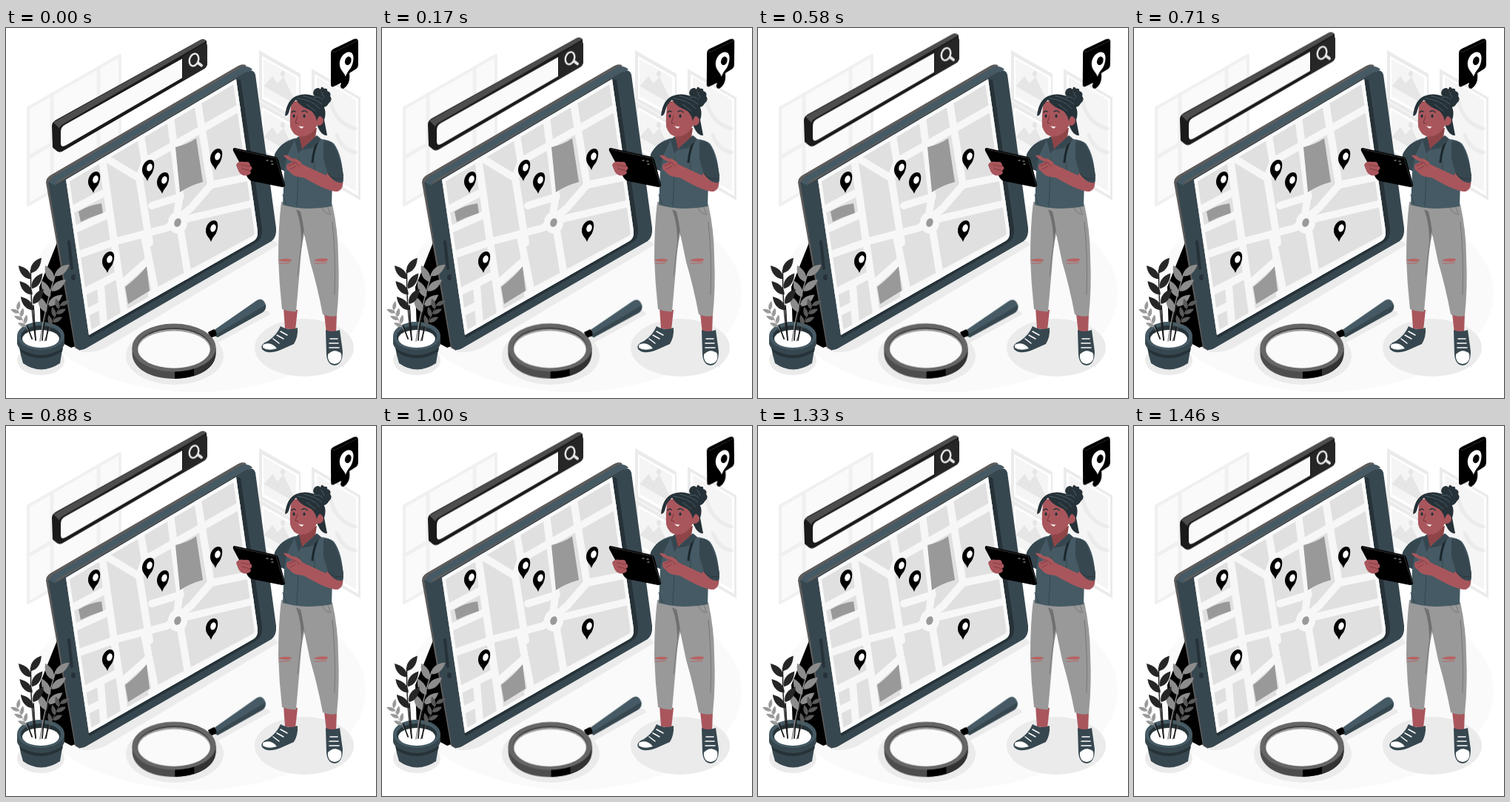
Recreate the animation shown at these times as an HTML page without scripts. Size 500 px wide and 500 px high, loop 1500 ms.

```html
<!DOCTYPE html>
<html lang="en">
<head>
<meta charset="utf-8">
<title>Location search</title>
<style>
html, body { margin: 0; height: 100%; overflow: hidden; background: #fff; }
svg { display: block; width: 100%; height: 100%; }
path { stroke-linejoin: round; }
.line { fill: none; stroke-linecap: round; }
.skin { fill: #a8565c; }
.bar { animation: float 1.5s linear infinite; }
.sway { animation: sway 1.5s linear infinite; }
.bubble { transform-origin: 457.5px 48px; }
.lens { transform-origin: 261px 420px; }
.pin { color: #000; --hole: #fff; }
@keyframes float { 50% { transform: translateY(-10px); } }
@keyframes sway {
  25% { transform: rotate(1deg); }
  75% { transform: rotate(-1deg); }
}
</style>
</head>
<body>
<svg viewBox="0 0 500 500">
<defs>
  <g id="pin">
    <path fill="currentColor" d="M-1 15C-3 9-8 7-8 0C-8-8-2-14 3-14C10-14 9-3 6 3C4 7 1 9-1 15Z"/>
    <ellipse cx=".8" cy="-4" rx="3.6" ry="5.200" transform="rotate(18)" fill="var(--hole)"/>
  </g>
  <path id="leaf" d="M0 0C-7-6-6-17 1-25C6-16 7-7 0 0Z"/>
  <g id="pair">
    <use href="#leaf" transform="rotate(-42)"/>
    <use href="#leaf" transform="translate(0 -8) rotate(36)"/>
  </g>
  <g id="sprig">
    <path class="line" d="M0 0Q-4-45 0-94" stroke="currentColor" stroke-width="1.5"/>
    <g fill="currentColor">
      <use href="#pair" y="-40"/>
      <use href="#pair" y="-61"/>
      <use href="#pair" y="-82"/>
    </g>
  </g>
  <g id="landscape">
    <path fill="#ebebeb" d="M342 30L398 62V130L342 98Z"/>
    <path fill="#fff" d="M346 38L396 66V123L346 95Z"/>
    <path fill="#f5f5f5" d="M348 42L392 67V117L348 92Z"/>
    <path fill="#e6e6e6" d="M349 78L360 65L367 75L375 66L391 99V103L349 79Z"/>
    <ellipse cx="374" cy="62" rx="3" ry="4" fill="#e6e6e6"/>
  </g>
  <clipPath id="screen"><path d="M81 205L311 69L340 274Q341 284 334 288L112 415Z"/></clipPath>
</defs>

<ellipse cx="257" cy="358" rx="229" ry="134" fill="#fafafa"/>

<g id="window">
  <path fill="#fafafa" stroke="#f0f0f0" stroke-width="4" d="M30 108L154 37V168L30 239Z"/>
  <path class="line" stroke="#f0f0f0" stroke-width="5" d="M62 90V220M125 54V185M32 174L153 104"/>
</g>

<g id="frames">
  <use href="#landscape"/>
  <use href="#landscape" y="69"/>
  <path fill="#ebebeb" d="M413 55L479 94V233L413 195Z"/>
  <path fill="#fff" d="M417 62L476 96V227L417 192Z"/>
  <path fill="#f5f5f5" d="M420 66L473 97V221L420 190Z"/>
  <path class="line" stroke="#ebebeb" stroke-width="5" d="M438 96Q444 128 472 136M447 145Q455 165 472 168"/>
</g>

<g id="shadows" fill="#ebebeb">
  <path d="M100 437L362 287L368 293L135 432Q115 441 100 437Z"/>
  <ellipse cx="47" cy="449" rx="32" ry="20"/>
  <ellipse cx="228" cy="443" rx="66" ry="39"/>
  <path d="M272 423L346 382Q356 381 357 387L287 425Z"/>
  <ellipse cx="403" cy="432" rx="67" ry="39"/>
</g>

<g id="tablet">
  <path d="M69 290L45 350L47 410L88 432L100 428Z"/>
  <path fill="#5e5b5b" d="M54 209Q54 203 60 199L314 51Q319 48 324 50L330 70L100 436L93 432Z"/>
  <path fill="#37474f" d="M57 208L68 211L323 60Q334 54 337 63L365 270Q366 282 359 288L108 433Q98 438 94 430Z"/>
  <path fill="#455a64" d="M58 208Q61 202 67 199L318 53Q327 50 333 56L328 60Q326 58 322 60L73 205Q67 208 67 213Z"/>
  <path fill="#263238" d="M311 69L317 70L346 271Q347 285 338 290L113 419L111 414Z"/>
  <path class="line" stroke="#263238" stroke-width="4" d="M85 289L89 325"/>
  <ellipse cx="91" cy="337" rx="3" ry="4" fill="#263238"/>
  <g clip-path="url(#screen)">
    <path fill="#e0e0e0" d="M70 60H350V420H70Z"/>
    <g class="line" stroke="#f7f7f7" stroke-width="10">
      <path d="M129 170L162 400M132 174L180 203L194 290M181 140L188 182M222 120L235 225L231 252M258 95L277 212M180 203L188 180L315 108"/>
      <path d="M92 244L134 222M96 271L138 252M102 305L150 288L218 270L250 243L277 212L330 201M244 258L338 236M236 274L247 340M187 282L203 362"/>
      <path d="M190 316L157 345M150 334L105 357M112 383L128 375M128 348L132 400M197 240L236 228M197 360L342 282"/>
    </g>
    <path class="line" stroke="#fafafa" stroke-width="9" d="M81 205L311 69L340 274Q341 284 334 288L112 415Z"/>
    <g fill="#999">
      <path d="M98 248Q113 239 129 237L131 250Q115 255 101 262Z"/>
      <path d="M229 161Q246 157 257 149L266 208Q248 213 235 222Z"/>
      <path d="M161 350Q180 335 190 322L194 355L165 373Z"/>
    </g>
    <ellipse cx="232" cy="263" rx="13" ry="15" fill="#f7f7f7"/>
    <ellipse cx="232" cy="263" rx="4.500" ry="6" fill="#999" transform="rotate(20 232 263)"/>
  </g>
  <g class="pin">
    <use href="#pin" x="119" y="208"/>
    <use href="#pin" x="192" y="192"/>
    <use href="#pin" x="212" y="209"/>
    <use href="#pin" x="284" y="177"/>
    <use href="#pin" x="278" y="274"/>
    <use href="#pin" x="138" y="316"/>
  </g>
</g>

<g id="plant">
  <path fill="#37474f" d="M15 417L20 442L23 453Q47 470 73 453L79 417Z"/>
  <path fill="#263238" d="M18 432Q47 452 77 432L76 437Q47 455 20 438Z"/>
  <path fill="#37474f" d="M15 416V427Q18 439 47 441Q76 439 79 427V416Z"/>
  <ellipse cx="47" cy="416" rx="32" ry="19" fill="#455a64"/>
  <ellipse cx="47" cy="417" rx="27" ry="15" fill="#263238"/>
  <ellipse cx="47" cy="420" rx="25" ry="12" fill="#fff"/>
  <g color="#8c8c8c"><use href="#sprig" transform="translate(46 423) rotate(13)"/></g>
  <g color="#262626"><use href="#sprig" transform="translate(40 421) rotate(-4)"/></g>
  <g color="#999"><use href="#sprig" transform="translate(37 421) rotate(-28) scale(.5)"/></g>
  <g color="#595959"><use href="#sprig" transform="translate(52 423) rotate(24) scale(.58)"/></g>
  <path class="line" stroke="#1a1a1a" stroke-width="1.700" d="M40 422L37 375M49 422Q50 398 58 375M35 420L29 403M54 422L57 405"/>
</g>

<g class="sway lens">
  <path fill="#455a64" d="M280 409L339 368Q347 363 351 374Q352 380 347 384L286 418Q280 416 280 409Z"/>
  <path fill="#37474f" d="M286 418L347 384Q352 380 351 374L284 414Z"/>
  <path d="M273 411L281 407Q286 411 284 416L276 419Z"/>
  <path fill="#4d4d4d" d="M170.500 432V440C171 460 195 474 227 474C259 474 283 460 283.500 440V432Z"/>
  <path d="M228 462V474C253 473 275 465 282 448V436Z"/>
  <path fill="#333" d="M254 458V470C272 464 283 453 283.500 440V432Z"/>
  <ellipse cx="227" cy="432" rx="56.500" ry="32.500" fill="#666"/>
  <ellipse cx="227" cy="432.500" rx="50" ry="27.500" fill="#404040"/>
  <ellipse cx="227" cy="433.500" rx="49.500" ry="26.500" fill="#a0a0a0"/>
  <ellipse cx="227" cy="434.500" rx="48.500" ry="25" fill="#fafafa"/>
</g>

<g id="woman">
  <g id="shoes">
    <path class="skin" d="M375 378L394 381L391 408L377 406ZM430 386L447 387L446 412L433 412Z"/>
    <path fill="#37474f" d="M371 403Q383 410 394 405Q395 417 389 427L371 435Q353 442 346 434Q343 427 354 423Q366 415 371 403Z"/>
    <path fill="#fff" d="M347 428Q358 423 366 433Q354 437 347 432Z"/>
    <path class="line" stroke="#fff" stroke-width="1.500" d="M361 420L369 426M366 415L375 420M371 410L380 415"/>
    <path fill="#37474f" d="M432 408Q440 412 451 408L455 437Q455 455 444 456Q434 455 433 441Z"/>
    <path fill="#fff" d="M435 441Q444 432 453 440Q455 453 444 454Q434 453 435 441Z"/>
    <path class="line" stroke="#fff" stroke-width="1.500" d="M438 420H448M437 426H449M437 432H450"/>
  </g>
  <g id="trousers">
    <path fill="#999" d="M372 235L441 238Q449 275 449 310Q451 350 447 389Q437 391 428 387Q421 350 411 316L403 278Q399 295 397 326L392 383Q383 384 373 380Q369 345 368 310Q368 268 372 235Z"/>
    <path fill="#707070" d="M392 245L398 248Q401 260 404 283L402 274L399 295Q400 265 392 245Z"/>
    <path class="line" stroke="#777" d="M427 238Q427 251 439 252M433 238L438 250M399 292Q396 315 394 335M441 262Q446 310 444 360"/>
    <path fill="#b86363" d="M367 314Q376 310 386 313L385 315Q376 317 367 314ZM415 314Q424 310 435 312L434 315Q424 317 415 314Z"/>
    <path class="line" stroke="#b86363" d="M369 318Q376 319 383 317M417 318Q425 319 433 317"/>
  </g>
  <path fill="#263238" d="M424 98Q435 110 430 124L434 145Q429 146 424 139L412 115Z"/>
  <g id="shirt">
    <path fill="#455a64" d="M390 149Q371 154 363 171L362 187L376 193L374 239Q405 248 440 241L441 206L456 207Q455 172 443 156Q437 151 425 150Z"/>
    <path fill="#37474f" d="M390 151Q371 154 363 171L362 187L376 193L380 172Z"/>
    <path class="line" stroke="#37474f" d="M396 176L393 241M417 180V196M374 225L379 239"/>
    <path class="line" stroke="#1c272c" stroke-width="3" d="M422 151Q416 163 414 181"/>
  </g>
  <path fill="#8f4548" d="M397 139L420 135L418 149Q407 155 399 165Q394 160 396 150Z"/>
  <path fill="#37474f" d="M396 146L390 151L395 170L400 163ZM420 145L399 165L414 162L426 150Z"/>
  <g id="head">
    <path class="skin" d="M386 100Q383 118 384 133Q387 145 398 147Q413 146 420 132Q429 133 429 124Q426 117 420 120L415 94Z"/>
    <path fill="#263238" d="M377 119Q379 98 392 92Q404 87 417 92Q413 88 417 83Q422 79 425 83Q426 77 430 82Q435 81 434 85Q440 87 438 92Q442 97 436 102Q433 108 427 107L429 119Q422 116 420 126Q418 113 406 109Q397 105 392 97Q385 103 383 111Q382 118 377 119Z"/>
    <path class="line" stroke="#53666f" stroke-width=".8" d="M394 95Q414 97 424 109M402 92Q420 96 427 103M416 94Q422 91 428 97M426 86L430 94M406 103L418 112"/>
    <path class="line" stroke="#263238" stroke-width="1.500" d="M386 114Q388 111 391 113M400 113Q404 110 407 114"/>
    <ellipse cx="389" cy="119" rx="1.600" ry="2.200" fill="#263238"/>
    <ellipse cx="403" cy="119" rx="1.600" ry="2.300" fill="#263238"/>
    <path class="line" stroke="#793538" d="M394 119L391 128L395 129"/>
    <path fill="#fff" d="M395 132Q399 134 402 133Q401 137 398 135Z"/>
  </g>
  <g id="device">
    <path d="M309 162L364 174Q367 175 368 178L377 211Q378 215 373 215L333 207Q329 206 327 203L307 166Q306 162 309 162Z"/>
    <path class="line" stroke="#333" d="M310 164L365 176L376 212"/>
    <path class="line" stroke="#777" stroke-width="1.500" d="M352 179H354M358 180H360M359 184H361"/>
    <path class="skin" d="M311 185Q313 179 323 181Q330 180 330 186Q335 189 330 193Q333 197 326 199Q318 201 314 193Z"/>
    <path class="line" stroke="#793538" stroke-width=".8" d="M318 185L329 187M319 190L330 193"/>
  </g>
  <g id="arm">
    <path class="skin" d="M375 172Q381 171 386 176Q396 176 400 184L432 199L438 192L455 204Q457 218 448 221Q436 222 402 202Q389 202 383 194Q377 190 380 184L388 181Q379 178 375 172Z"/>
    <path fill="#37474f" d="M429 153Q440 150 446 164Q453 180 456 199L455 209Q444 211 435 197L429 176Z"/>
    <path class="line" stroke="#263238" stroke-width=".8" d="M435 197Q444 207 455 203"/>
    <path class="line" stroke="#793538" stroke-width=".8" d="M382 186L390 183M384 191L391 187M388 181Q394 182 396 187"/>
  </g>
</g>

<g class="sway bubble">
  <path d="M439 34Q439 30 443 28L470 15Q476 13 476 19V49Q476 54 472 56L464 61Q466 76 456 82Q452 82 452 78L453 74L443 79Q439 81 439 76Z"/>
  <path class="line" stroke="#333" stroke-width=".8" d="M440 31L443 33L475 17"/>
  <g color="#fff" style="--hole:#000"><use href="#pin" transform="translate(460 48.500) scale(1.150)"/></g>
</g>

<g class="bar">
  <g transform="translate(0 1.500)">
    <path fill="#1a1a1a" d="M62 131Q62 126 67 123L262 15Q267 12 271 16L272 46Q272 51 267 54L80 163Q73 168 69 165L63 160Z"/>
    <path fill="#4d4d4d" d="M64 126L262 15Q267 12 271 16L76 129Q73 131 72 134Z"/>
    <path fill="#262626" d="M239 37L267 20Q272 18 272 23V46Q272 51 267 54L239 70Z"/>
    <path fill="#fafafa" d="M74 139Q74 132 80 129L238 40V66L81 157Q74 161 74 154Z"/>
    <ellipse cx="254" cy="41.500" rx="6" ry="8.500" transform="rotate(18 254 41.500)" fill="none" stroke="#e6e6e6" stroke-width="2.500"/>
    <path class="line" stroke="#e6e6e6" stroke-width="4" d="M260 46L264 49"/>
  </g>
</g>
</svg>
</body>
</html>
```
